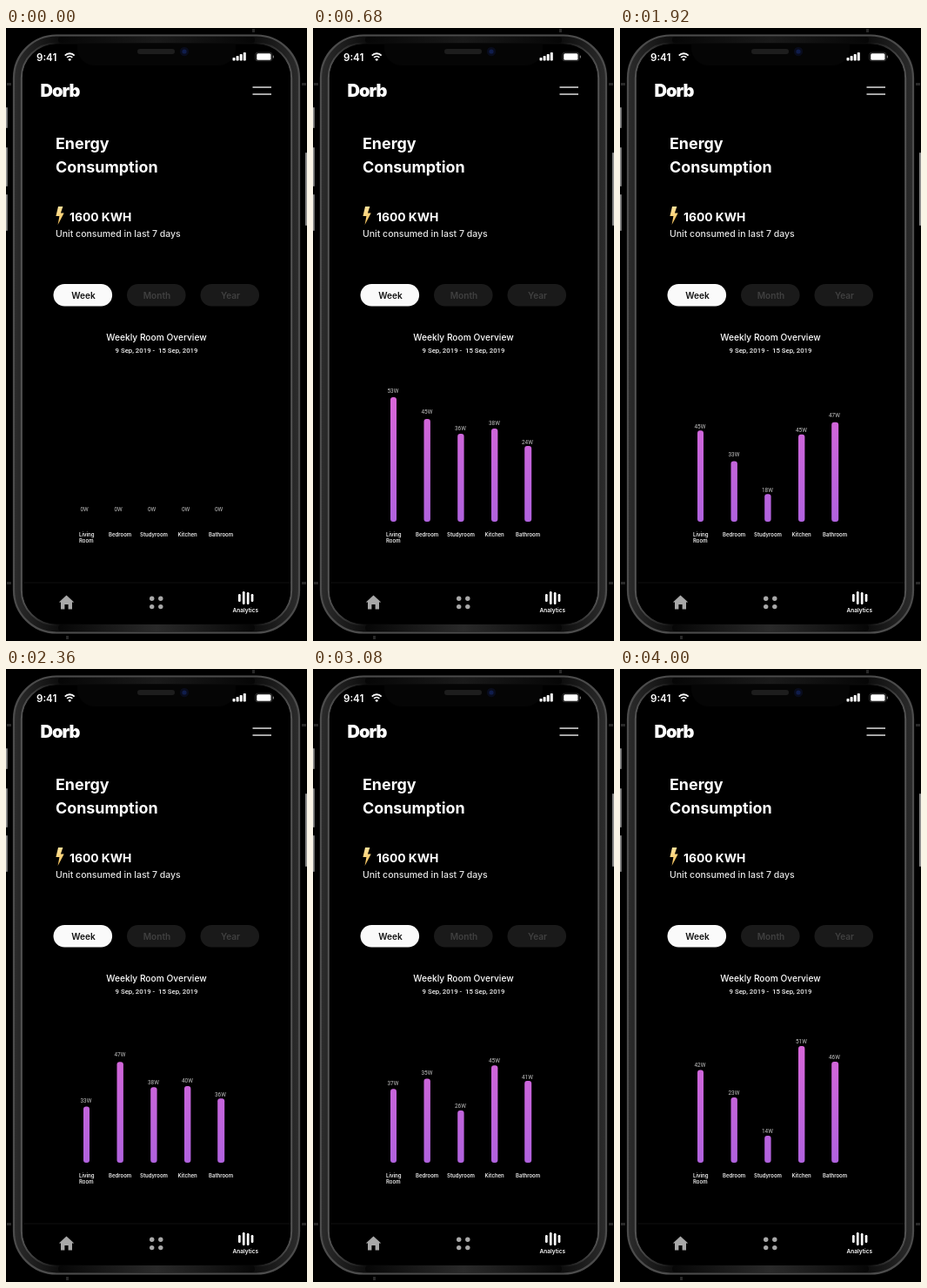
These frames come from a looping animation (346 by 704 pixels, 4960 ms). An HTML page with a canvas:

```html
<!DOCTYPE html>
<html lang="en">
<head>
<meta charset="utf-8">
<title>Energy Consumption</title>
<style>
html, body { margin: 0; width: 100%; height: 100%; overflow: hidden; background: #000; }
canvas { display: block; width: 346px; height: 704px; }
</style>
</head>
<body>
<canvas id="stage"></canvas>
<script>
const W = 346, H = 704, LOOP = 4960, BASE = 567;
const canvas = document.getElementById('stage');
const dpr = window.devicePixelRatio || 1;
canvas.width = W * dpr;
canvas.height = H * dpr;
const ctx = canvas.getContext('2d');
const SANS = 'Inter, sans-serif', NARROW = 'Roboto, sans-serif';

const bars = [
  { x: 89, w: 7, label: 85.5 },
  { x: 127.5, w: 7.4, label: 124.5 },
  { x: 166.2, w: 7.4, label: 163 },
  { x: 205, w: 7.4, label: 202 },
  { x: 243.2, w: 8, label: 240 }
];

// Per state: bar tops, label centres and watt readings.
const states = [
  { top: [567, 567, 567, 567, 567], label: [553, 553, 553, 553, 553], watt: [0, 0, 0, 0, 0] },
  { top: [424, 449, 466, 460, 480], label: [417, 441, 459.5, 454, 475.5], watt: [53, 45, 36, 38, 24] },
  { top: [459.7, 500.5, 539, 466, 450], label: [454.8, 493, 534.3, 460.5, 442.2], watt: [46, 32, 16.4, 45, 48.2] },
  { top: [507, 446, 474, 480.5, 498], label: [500, 437.5, 468.5, 474.4, 494], watt: [32, 48.4, 40, 39, 35] },
  { top: [460.5, 492, 536, 433, 451], label: [455, 486.5, 531, 427.5, 445.5], watt: [42, 23, 14, 51, 46] }
];
const moves = [[0, 680], [820, 1640], [1800, 2520], [2720, 3420]];

const ease = u => u < 0.5 ? 2 * u * u : 1 - 2 * (1 - u) * (1 - u);
const mix = (a, b, p) => a + (b - a) * p;

function box(x, y, w, h, r, fill) {
  ctx.beginPath();
  ctx.roundRect(x, y, w, h, r);
  ctx.fillStyle = fill;
  ctx.fill();
}

function outline(x, y, w, h, r, color, width) {
  ctx.beginPath();
  ctx.roundRect(x, y, w, h, r);
  ctx.strokeStyle = color;
  ctx.lineWidth = width;
  ctx.stroke();
}

function dot(x, y, r, fill) {
  ctx.beginPath();
  ctx.arc(x, y, r, 0, Math.PI * 2);
  ctx.fillStyle = fill;
  ctx.fill();
}

function shape(points, fill) {
  ctx.beginPath();
  points.forEach(([x, y]) => ctx.lineTo(x, y));
  ctx.closePath();
  ctx.fillStyle = fill;
  ctx.fill();
}

function text(str, x, y, size, { weight = 400, color = '#fff', align = 'left', font = SANS, spacing = 0 } = {}) {
  ctx.font = `${weight} ${size}px ${font}`;
  ctx.letterSpacing = spacing + 'px';
  ctx.textAlign = align;
  ctx.fillStyle = color;
  ctx.fillText(str, x, y);
}

function gradient(x0, y0, x1, y1, ...stops) {
  const g = ctx.createLinearGradient(x0, y0, x1, y1);
  stops.forEach((c, i) => g.addColorStop(i / (stops.length - 1), c));
  return g;
}

function drawPhone() {
  box(0, 0, W, H, 0, '#000');
  for (const [y, h] of [[91, 24], [137, 45], [191, 42]]) box(0, y, 1.8, h, 0.8, '#8a8a8a');
  box(344, 143, 2, 84, 0.8, '#8a8a8a');
  for (const y of [63, 636]) {
    box(1, y, 5, 3, 0, '#282828');
    box(340, y, 5, 3, 0, '#282828');
  }
  box(283, 1, 3, 4, 0, '#282828');
  box(69, 698, 3, 4, 0, '#282828');

  // The rim is bright along both sides and fades out at top and bottom.
  const sides = (color, fade) => gradient(8, 0, 338, 0, color, fade, fade, fade, fade, fade, color);
  box(7.5, 7, 331, 689, 50, '#060606');
  outline(14, 13.5, 318, 676, 44, sides('#2c2c2c', '#0c0c0c'), 9);
  outline(9, 8.5, 328, 686, 49, '#4c4c4c', 2.2);
  outline(17.8, 17.5, 310.4, 668, 40, sides('#626262', '#0a0a0a'), 2);
  box(60, 685, 226, 8, 4, gradient(60, 0, 286, 0, '#060606', '#2a2a2a', '#060606'));
  box(60, 10, 226, 7, 3, gradient(60, 0, 286, 0, '#060606', '#1a1a1a', '#060606'));
  box(19, 18.5, 308, 666, 39, '#000');

  box(82, 18, 182, 25, [0, 0, 20, 20], '#050505');
  box(151, 24, 43, 6, 3, '#1d1d1d');
  dot(205, 27, 5.2, '#090c1c');
  dot(205, 27, 2.6, '#101d4c');
}

function drawStatus() {
  text('9:41', 35, 37.5, 11.6, { weight: 600 });
  ctx.strokeStyle = '#fff';
  ctx.lineWidth = 1.9;
  for (const r of [4.4, 7.7]) {
    ctx.beginPath();
    ctx.arc(73.2, 37, r, -Math.PI * 0.75, -Math.PI * 0.25);
    ctx.stroke();
  }
  shape([[73.2, 38], [71.2, 35.9], [73.2, 35], [75.2, 35.9]], '#fff');
  for (let i = 0; i < 4; i++) {
    const h = 3.5 + i * 2;
    box(260.5 + i * 4.1, 37.5 - h, 3, h, 0.8, '#fff');
  }
  outline(286.8, 28.2, 19, 9.6, 2.6, '#444', 0.8);
  box(288.2, 29.2, 16.3, 7.6, 1.5, '#fff');
  box(306.8, 31.4, 1.2, 3.2, 0.6, '#777');
}

function drawHeader() {
  text('Dorb', 39.5, 79, 20, { weight: 900, spacing: -1 });
  box(283.5, 67.3, 21.5, 1.5, 0, '#ddd');
  box(283.5, 75.3, 21.5, 1.5, 0, '#ddd');
  text('Energy', 57, 139, 17.9, { weight: 700 });
  text('Consumption', 57, 166, 17.9, { weight: 700 });
  shape([[60, 205], [65.4, 205], [62.9, 212.6], [66.7, 212.6], [59.6, 226], [61.4, 216], [57.4, 216]],
    gradient(57, 205, 67, 226, '#ffe6a2', '#f5bd4f'));
  text('1600 KWH', 73, 222, 13.8, { weight: 700 });
  text('Unit consumed in last 7 days', 57, 240, 10.5, { weight: 500, color: '#e6e6e6' });
}

function drawTabs() {
  const tabs = [['Week', 54.5, 89, '#fafafa', '#111'], ['Month', 139, 173.5, '#1a1a1a', '#404040'], ['Year', 223.5, 258, '#1a1a1a', '#404040']];
  for (const [name, x, mid, fill, color] of tabs) {
    box(x, 294, 67.6, 25.6, 12.8, fill);
    text(name, mid, 310.8, 10.1, { weight: 600, color, align: 'center' });
  }
  text('Weekly Room Overview', 173, 358.5, 10.2, { weight: 500, align: 'center' });
  text('9 Sep, 2019 -  15 Sep, 2019', 173, 373.4, 7.8, { weight: 500, align: 'center', font: NARROW, color: '#eee' });
}

function drawRooms() {
  const rooms = [['Living', 84, 583.5], ['Room', 84, 591], ['Bedroom', 118, 583.5], ['Studyroom', 154, 583.5], ['Kitchen', 197.5, 583.5], ['Bathroom', 233, 583.5]];
  for (const [name, x, y] of rooms) text(name, x, y, 6, { weight: 600, color: '#eee' });
}

function drawNav() {
  box(20, 636.5, 307, 1, 0, '#111');
  shape([[69.5, 651.5], [78.3, 659.6], [76, 659.6], [76, 667.5], [71.6, 667.5], [71.6, 662],
    [67.4, 662], [67.4, 667.5], [63, 667.5], [63, 659.6], [60.8, 659.6]], '#a8a8a8');
  for (const x of [167.7, 177.8]) for (const y of [655.3, 664.6]) dot(x, y, 2.7, '#a8a8a8');
  [[267, 650, 9], [271.9, 647, 15], [276.8, 648, 14], [281.7, 650, 9]]
    .forEach(([x, y, h]) => box(x, y, 2.7, h, 1.2, '#fff'));
  text('Analytics', 275.3, 670.5, 6.5, { weight: 600, align: 'center' });
}

function drawChart(t) {
  let i = moves.length - 1;
  while (i > 0 && t < moves[i][0]) i--;
  const [start, end] = moves[i];
  const p = ease(Math.min(1, (t - start) / (end - start)));
  const at = (key, n) => mix(states[i][key][n], states[i + 1][key][n], p);
  const fill = gradient(0, 424, 0, BASE, '#d967d8', '#b062de');
  bars.forEach((bar, n) => {
    const top = at('top', n), h = BASE - top;
    if (h > 0.3) box(bar.x, top, bar.w, h, Math.min(3, h / 2), fill);
    text(Math.round(at('watt', n)) + 'W', bar.label, at('label', n) + 2.3, 6.4, { font: NARROW, color: '#c4c4c4' });
  });
}

function frame(now) {
  ctx.setTransform(dpr, 0, 0, dpr, 0, 0);
  drawPhone();
  drawStatus();
  drawHeader();
  drawTabs();
  drawChart(now % LOOP);
  drawRooms();
  drawNav();
}

const began = performance.now();
function tick() {
  frame(performance.now() - began);
  requestAnimationFrame(tick);
}
tick();
</script>
</body>
</html>
```
